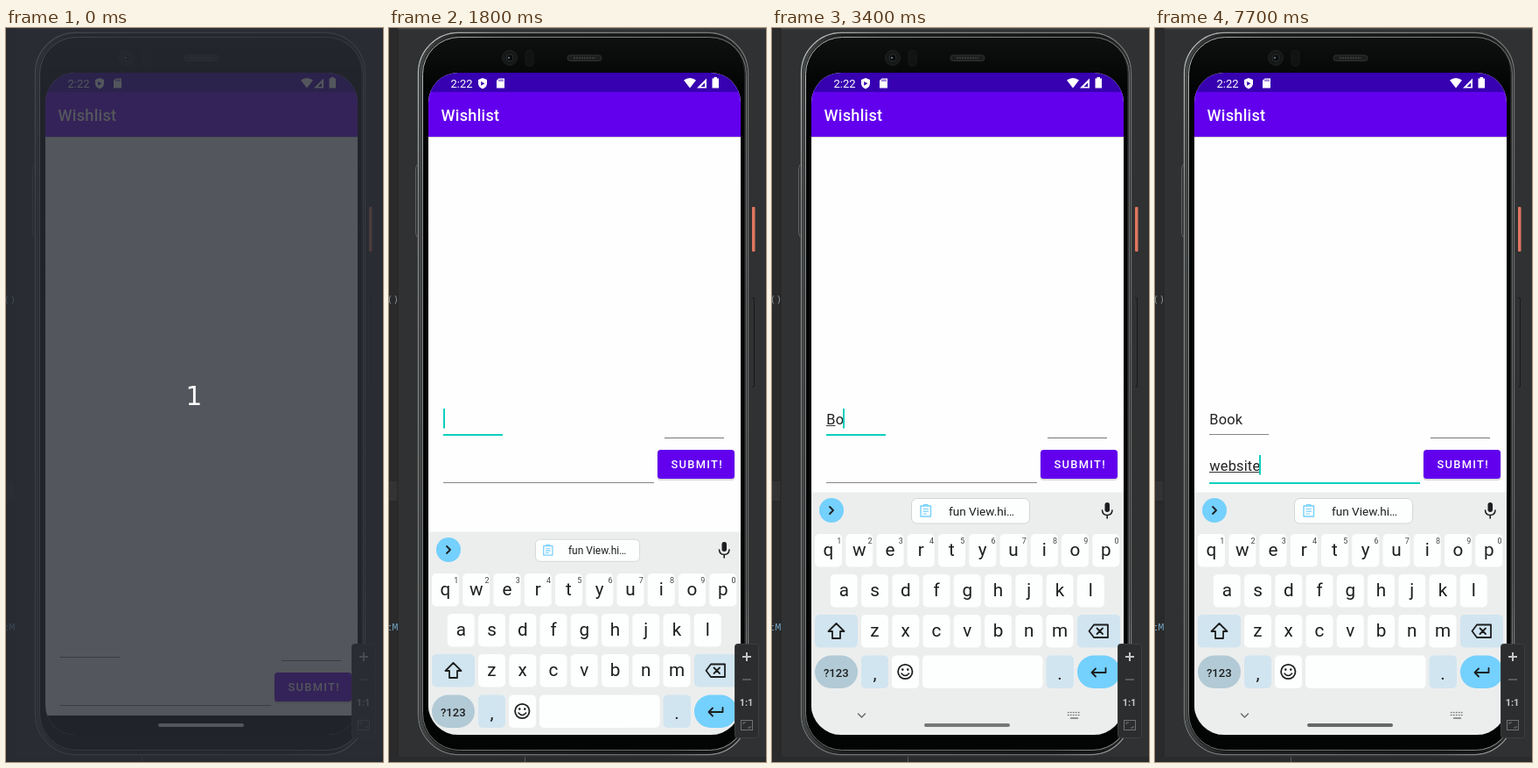
An HTML page that plays this animation: 431 by 837 pixels, repeating every 8000 ms.

```html
<!DOCTYPE html>
<html lang="en">
<head>
<meta charset="utf-8">
<title>Wishlist app demo</title>
<style>
html, body { margin: 0; width: 100%; height: 100%; overflow: hidden; background: #2f3132; }
svg { display: block; width: 100vw; height: 100vh; font-family: Roboto, sans-serif; }
.mono { font: 11.5px "Noto Sans Mono", monospace; }
.entry { font-size: 16.35px; letter-spacing: .2px; fill: #222; }
.mid { text-anchor: middle; }
.line { fill: none; stroke-linecap: round; stroke-linejoin: round; }
</style>
</head>
<body>
<svg viewBox="0 0 431 837" preserveAspectRatio="none">
  <defs>
    <clipPath id="screenClip"><rect x="45" y="51" width="357" height="755" rx="34"/></clipPath>
    <clipPath id="editorClip"><rect width="10" height="837"/></clipPath>
    <linearGradient id="rim" x1="0" y1="0" x2="1" y2="1">
      <stop offset="0" stop-color="#c4c6c6"/>
      <stop offset=".12" stop-color="#8a8c8c"/>
      <stop offset=".5" stop-color="#747676"/>
      <stop offset=".88" stop-color="#686a6a"/>
      <stop offset="1" stop-color="#a4a6a6"/>
    </linearGradient>
    <linearGradient id="band">
      <stop offset="0" stop-color="#454848"/>
      <stop offset=".12" stop-color="#1d1f1f"/>
      <stop offset=".9" stop-color="#161818"/>
      <stop offset="1" stop-color="#2a2c2c"/>
    </linearGradient>
    <linearGradient id="body" x1="0" y1="0" x2="0" y2="1">
      <stop offset="0" stop-color="#101212"/>
      <stop offset=".08" stop-color="#020303"/>
      <stop offset="1" stop-color="#030404"/>
    </linearGradient>
  </defs>

  <!-- desktop behind the device -->
  <rect width="431" height="837" fill="#2f3132"/>
  <rect x="10" width="421" height="1.5" fill="#46494a"/>
  <rect width="10" height="837" fill="#2a2a2a"/>
  <rect y="517" width="10" height="22" fill="#333"/>
  <rect x="9.5" width="1" height="831" fill="#242525"/>
  <rect y="831" width="431" height="6" fill="#2a2b2c"/>
  <rect x="155" y="831" width="1" height="6" fill="#5a5c5d"/>
  <g class="mono" clip-path="url(#editorClip)">
    <text id="code" x="-2.500" y="313">()</text>
    <text x="-3.500" y="687" fill="#6f9fbf">tM</text>
  </g>

  <!-- device -->
  <path class="line" d="M32 156q-1.500 2-1.500 6v70q0 4 1.500 6" stroke="#606363"/>
  <rect x="415" y="204" width="3.500" height="51" rx="1" fill="#e0755f"/>
  <path class="line" d="M415.500 308h2v101h-2" stroke="#191a1a"/>
  <rect x="33.500" y="5.500" width="377" height="823" rx="46" fill="url(#body)" stroke="url(#rim)" stroke-width="1.300"/>
  <rect x="36" y="8" width="372" height="818" rx="44" fill="none" stroke="url(#band)" stroke-width="3.500"/>
  <rect x="38.500" y="10.500" width="370" height="813" rx="42" fill="none" stroke="url(#rim)"/>
  <circle cx="138" cy="34" r="8.500" fill="#161818" stroke="#202222"/>
  <circle cx="138" cy="34" r="4" fill="#07090a" stroke="#292d2f"/>
  <circle cx="137" cy="34" r="1.300" fill="#5d656b"/>
  <rect x="156" y="25.500" width="9" height="18" rx="4" fill="#111313" stroke="#181a1a"/>
  <rect x="204" y="31" width="39" height="6.500" rx="3.200" fill="#1c1e1e" stroke="#303232"/>
  <path d="M211 34.300h25" stroke="#3a3c3c" stroke-width="2" stroke-dasharray="2 1"/>

  <g clip-path="url(#screenClip)">
    <rect x="45" y="51" width="357" height="755" fill="#fefefe"/>
    <rect x="45" y="51" width="357" height="22" fill="#3700b0"/>
    <rect x="45" y="73" width="357" height="51" fill="#6200ee"/>
    <rect x="45" y="124" width="357" height="1" fill="#000" opacity=".16"/>
    <g fill="#fff">
      <text x="70.500" y="67.700" font-size="13">2:22</text>
      <path d="M107 57l5 2v4q0 4.500-5 6.500q-5-2-5-6.500v-4z"/>
      <path d="M125.500 57.500h6.500v11h-9v-8.500z"/>
      <path d="M337 59.500q7-5 14 0l-7 9z"/>
      <path d="M363 57.500v11h-11z"/>
      <path d="M371.500 56h3.500v1.500h2v11h-7.500v-11h2z"/>
      <text x="59.500" y="106" font-size="18.200" font-weight="500" letter-spacing=".25">Wishlist</text>
    </g>
    <path d="M105.200 61l4.200 2.300l-4.200 2.400z" fill="#3700b0"/>
    <path d="M126 58.500v2.500m2-2.500v2.500m2-2.500v2.500" stroke="#3700b0" stroke-width=".9"/>
    <path d="M361 62.500v4.500h-4.500z" fill="#3700b0"/>

    <!-- form, placed for the raised layout -->
    <g id="form">
      <rect id="nameLine" x="62" width="68"/>
      <rect x="315" y="467" width="68" height="1" fill="#777"/>
      <rect id="linkLine" x="62" width="241"/>
      <rect x="306.500" y="482" width="89" height="34" rx="4" fill="#000" opacity=".14"/>
      <rect x="307" y="481" width="88" height="33" rx="3.500" fill="#6200ee"/>
      <text class="mid" x="352.200" y="502" font-size="12.900" font-weight="500" letter-spacing="1.300" fill="#fff">SUBMIT!</text>
      <g id="name"></g>
      <g id="link"></g>
    </g>

    <rect x="45" y="784" width="357" height="22" fill="#000"/>
    <g id="keyboard"></g>
    <rect id="handle" x="174" y="793" width="98" height="4" rx="2"/>
  </g>

  <!-- zoom panel -->
  <rect x="395.500" y="702.500" width="27" height="107" rx="3" fill="#2b2d2e" stroke="#3c3f40"/>
  <path d="M404 717h10m-5-5v10" stroke="#c3c5c6" stroke-width="2"/>
  <path d="M404 743h10" stroke="#66696a" stroke-width="1.500"/>
  <text class="mid" x="408.500" y="773" font-size="11" font-weight="700" fill="#c3c5c6">1:1</text>
  <g fill="none" stroke="#707375">
    <rect x="402.500" y="789.500" width="13" height="11"/>
    <path d="M405 794v-2h3m2 6h3v-2"/>
  </g>

  <g id="intro">
    <rect width="431" height="837" fill="#282c34" opacity=".8"/>
    <text class="mid" x="215" y="430" font-size="29.500" fill="#fff" font-family="DejaVu Sans, sans-serif">1</text>
  </g>
</svg>

<script>
const LOOP = 8000;
const TEAL = '#0ccfbd';
const INK = '#1c1e1f', SKY = '#74d0fc', PALE = '#d1e5f0';
const $ = id => document.getElementById(id);
const set = (el, attrs) => {
  for (const k in attrs) el.setAttribute(k, attrs[k]);
  return el;
};
const add = (parent, tag, attrs, text = '') => {
  const el = set(document.createElementNS('http://www.w3.org/2000/svg', tag), attrs);
  el.textContent = text;
  return parent.appendChild(el);
};

// A track lists [start, value] pairs; each value holds until the next start.
const at = (track, t) => {
  let value = track[0][1];
  for (const [start, v] of track) if (t >= start) value = v;
  return value;
};

const slide = [[0, 290], [1700, 150], [1800, 45], [1900, 14], [2000, 4], [2100, 0]];
const chipScale = [[0, .7], [1800, .882], [1900, 1]];
const handleTone = [[0, '#fff'], [2300, '#bcbdbd'], [2500, '#a0a1a1'], [2700, '#8a8b8b'],
  [3000, '#767777'], [3600, '#6c6d6d'], [3700, '#666767']];

// typed: letters shown; marked: letters underlined as being composed
const fields = {
  name: {
    word: 'Book', base: 452, lineY: 463,
    typed: [[0, 0], [3200, 1], [3400, 2], [3600, 3], [3700, 4]],
    marked: [[0, 0], [3200, 1], [3600, 2], [3700, 3], [3900, 4], [5400, 0]],
    caret: [[0, 0], [1400, 1], [2000, 0], [2500, 1], [3000, 0], [3200, 1], [4400, 0], [5000, 1], [5400, 0]],
    focus: [[0, 0], [1300, 1], [5400, 0]]
  },
  link: {
    word: 'website', base: 505, lineY: 518,
    typed: [[0, 0], [6000, 1], [6100, 2], [6500, 3], [6800, 4], [7100, 5], [7400, 6], [7500, 7]],
    marked: [[0, 0], [6000, 1], [6400, 2], [6700, 3], [7000, 4], [7400, 5], [7500, 6], [7700, 7]],
    caret: [[0, 0], [5200, 1]],
    focus: [[0, 0], [5200, 1]]
  }
};

function buildField(id, f) {
  const g = $(id);
  f.text = add(g, 'text', { class: 'entry', x: 62.3, y: f.base });
  f.mark = add(g, 'rect', { x: 62, y: f.base + 1, height: 1, fill: '#333' });
  f.bar = add(g, 'rect', { y: f.base - 18, width: 2, height: 22.5, fill: TEAL });
  f.line = $(id + 'Line');
}

function drawField(f, t) {
  const typed = at(f.typed, t), marked = at(f.marked, t), focus = at(f.focus, t);
  f.text.textContent = f.word.slice(0, typed);
  const span = n => n ? f.text.getSubStringLength(0, n) : 0;
  set(f.mark, { width: span(marked) });
  set(f.bar, { x: Math.round(62 + span(typed) - .5), opacity: at(f.caret, t) });
  set(f.line, { y: f.lineY, height: focus ? 2 : 1, fill: focus ? TEAL : '#858585' });
}

function buildKeyboard(g) {
  const box = (x, y, w, fill, rx = 5) => add(g, 'rect', { x, y, width: w, height: 37.5, rx, fill });
  const label = (x, y, size, s, extra) =>
    add(g, 'text', { class: 'mid', x, y, 'font-size': size, fill: INK, ...extra }, s);
  const icon = (d, width = 1.8, stroke = INK, parent = g) =>
    add(parent, 'path', { class: 'line', d, stroke, 'stroke-width': width });

  add(g, 'rect', { x: 45, y: 529.5, width: 357, height: 300, fill: '#eceeee' });

  add(g, 'circle', { cx: 68, cy: 550, r: 14, fill: SKY });
  icon('M66 546l4 4l-4 4');
  const chip = add(g, 'g', {});
  add(chip, 'rect', { x: 159.5, y: 536.5, width: 135, height: 28.5, rx: 6, fill: '#fdfefe', stroke: '#d0d5d7' });
  icon('M170 545h11.500v12h-11.500z', 1.4, SKY, chip);
  icon('M173.500 544.500v-1h4.500v1M173 548.500h5.500M173 551.200h5.500M173 554h3.500', 1.2, SKY, chip);
  add(chip, 'text', { x: 202, y: 555.5, 'font-size': 13.6, fill: INK }, 'fun View.hi…');
  add(g, 'rect', { x: 380.5, y: 541, width: 5.5, height: 11, rx: 2.75, fill: INK });
  icon('M377.500 550q.5 5.500 5.700 5.500q5.300 0 5.800-5.500M383.200 555.500v3.500', 1.6);

  ['qwertyuiop', 'asdfghjkl', 'zxcvbnm'].forEach((row, r) => {
    const first = [64.5, 82.3, 117.5][r], y = 577 + 46 * r;
    [...row].forEach((letter, i) => {
      const x = first + 35.25 * i;
      box(x - 15.5, y, 31, '#fdfefe');
      label(x, y + 25.3, 20.7, letter);
      if (r === 0) label(x + 12.3, y + 10.5, 9, (i + 1) % 10, { fill: '#444' });
    });
  });

  box(49, 669, 49, PALE);
  icon('M73.500 679l9 9h-4.500v8h-9v-8h-4.500z');
  box(349, 669, 49, PALE);
  icon('M368 680.500h16v14.500h-16l-5.500-7.250zM371.500 684.500l6.500 6.500m0-6.500l-6.500 6.500');

  box(49, 715.5, 49, '#b2cad5', 18.7);
  label(73.3, 739.5, 13.1, '?123', { 'font-weight': 500 });
  box(102, 715.5, 31, PALE);
  label(117.5, 743, 21, ',');
  box(137, 715.5, 31, '#fdfefe');
  add(g, 'circle', { cx: 152.3, cy: 734, r: 8.2, fill: 'none', stroke: INK, 'stroke-width': 1.8 });
  icon('M149.300 731.500v.1M155.300 731.500v.1', 2.6);
  icon('M148 736q4.300 5 8.600 0', 1.6);
  box(172, 715.5, 137.5, '#fdfefe');
  box(313.5, 715.5, 31.5, PALE);
  label(329, 743, 21, '.');
  box(349, 715.5, 49, SKY, 18.7);
  icon('M381.500 730v5h-16m4.500-4.500l-4.500 4.500l4.500 4.500');

  icon('M98.500 782l4 4l4-4', 1.4, '#666');
  [780.5, 783.5].forEach(y => icon(`M338.500 ${y}h14`, 1.6, '#777').setAttribute('stroke-dasharray', '.4 2.6'));
  icon('M341.500 787h8', 1.5, '#777');
  return chip;
}

const chip = buildKeyboard($('keyboard'));
for (const id in fields) buildField(id, fields[id]);

function draw(t) {
  const k = at(chipScale, t);
  set($('intro'), { visibility: t < 100 ? 'visible' : 'hidden' });
  set($('code'), { fill: t < 1300 ? '#9fb3c4' : '#858d94' });
  set($('form'), { transform: `translate(0 ${t < 1700 ? 254 : 0})` });
  set($('keyboard'), {
    transform: `translate(0 ${at(slide, t)})`,
    visibility: t < 1700 ? 'hidden' : 'visible'
  });
  set(chip, { transform: `translate(227 550.5) scale(${k}) translate(-227 -550.5)` });
  set($('handle'), { fill: at(handleTone, t) });
  for (const id in fields) drawField(fields[id], t);
}

const start = performance.now();
function tick() {
  draw((performance.now() - start) % LOOP);
  requestAnimationFrame(tick);
}
tick();
</script>
</body>
</html>
```
